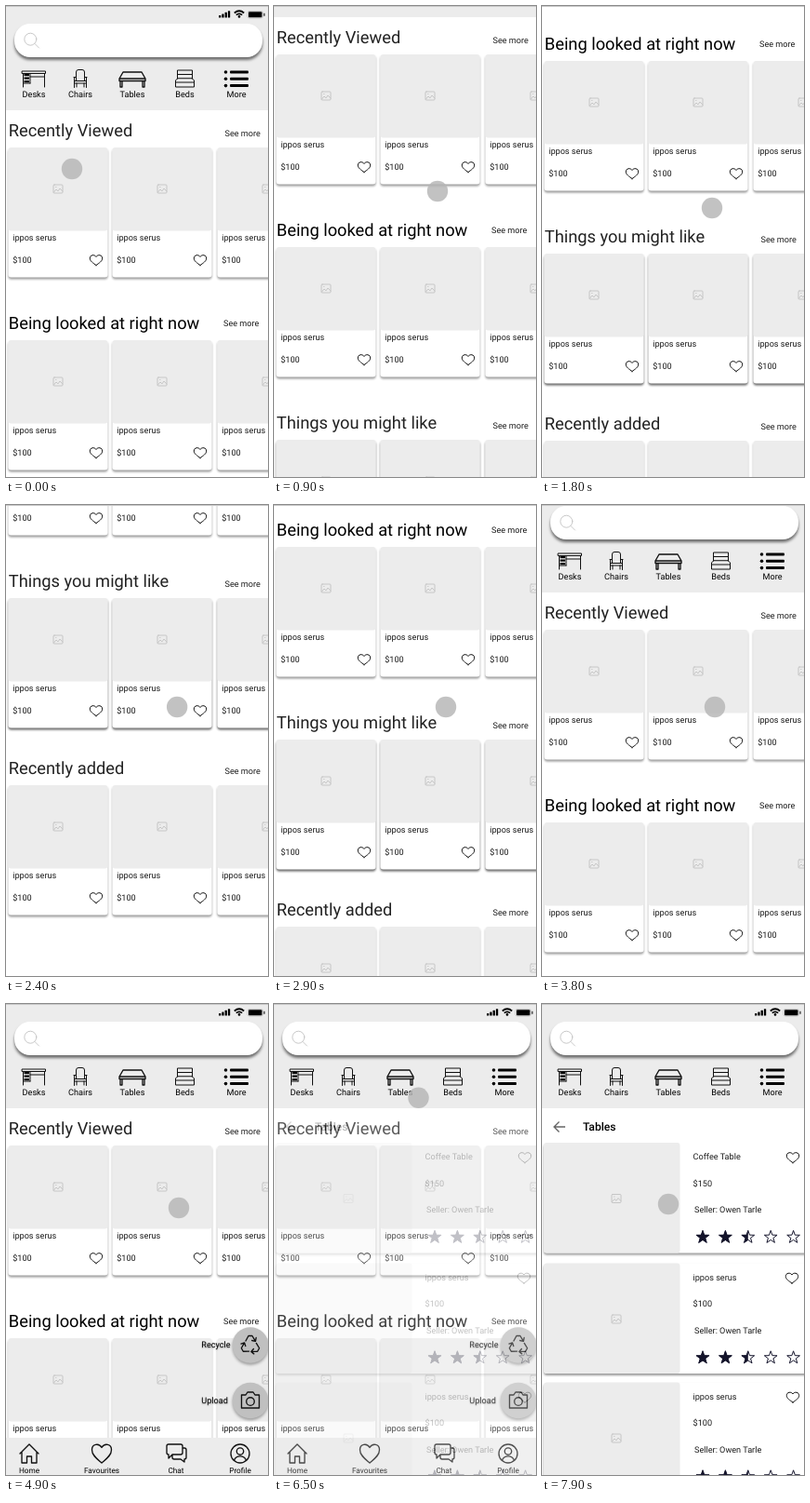
An HTML page that plays this animation: 282 by 506 pixels, repeating every 8000 ms.

```html
<!DOCTYPE html>
<html lang="en">
<head>
<meta charset="utf-8">
<title>Furniture shop prototype</title>
<style>
  html, body { margin: 0; width: 100%; height: 100%; overflow: hidden; background: #fff; }
  svg { display: block; width: 282px; height: 506px; }
  text { font: 9.15px Roboto, sans-serif; fill: #1c1c1c; text-rendering: geometricPrecision; }
  .title { font-size: 18.3px; fill: #222; }
  .heading { font-size: 12.1px; font-weight: 500; fill: #000; }
  .mid { text-anchor: middle; fill: #000; }
  .nav { font-size: 8.25px; }
  .float { fill: #000; text-shadow: 0 1px 1.5px #0006; }
  .line { fill: none; stroke: #111; stroke-width: 1; stroke-linejoin: round; stroke-linecap: round; }
  .bold { stroke-width: 1.35; }
  .pale { stroke: #c2c2c2; stroke-width: .9; }
  .card { fill: #fff; filter: drop-shadow(0 2px 1.1px #0006); }
  .dark { filter: drop-shadow(0 2px 1.1px #0009); }
  .search { fill: #fff; filter: drop-shadow(0 3px 1.5px #0008); }
  .fab { fill: #c0c0c0; filter: drop-shadow(0 2px 1.5px #0005); }
  .grey { fill: #ececec; }
</style>
</head>
<body>
<svg id="stage" viewBox="0 0 282 506"></svg>
<script>
const at = (x, y, body, scale = 1) => `<g transform="translate(${x} ${y}) scale(${scale})">${body}</g>`;
const label = (x, y, words, cls = '') => `<text x="${x}" y="${y}" class="${cls}">${words}</text>`;
const rect = (x, y, w, h, cls = '', r = 0) => `<rect x="${x}" y="${y}" width="${w}" height="${h}" rx="${r}" class="${cls}"/>`;
const line = (d, cls = '') => `<path d="${d}" class="line ${cls}"/>`;
const circle = (x, y, r, cls) => `<circle cx="${x}" cy="${y}" r="${r}" class="${cls}"/>`;

// Icons are drawn around their own centre.
const heart = line('M0 5.5C-3 3.2-6.7 1.2-6.7-1.9C-6.7-5.8-1.6-6.4 0-3.5C1.6-6.4 6.7-5.8 6.7-1.9C6.7 1.2 3 3.2 0 5.5Z');
const bigHeart = line('M0 10C-4.5 6-10.5 2-10.5-4C-10.5-10.5-3-11.5 0-6.5C3-11.5 10.5-10.5 10.5-4C10.5 2 4.5 6 0 10Z', 'bold');
const picture = rect(-5, -4.5, 10, 9, 'line pale', 1) + line('M-4.5 3.5L-2 .5L0 2.4L2-.5L4.8 2.5M-2.4-2h.4', 'pale');
const desk = line('M-12.5-8H12.5V-5.5H-12.5ZM-11.5-5V9M11.5-5V9M-4 5V-5M-11 5H-4M-4-2H11')
  + [-5, -1.5, 2].map(y => rect(-10.5, y, 5.5, 2.2)).join('');
const chair = line('M-4.5-1V-7Q-4.5-9.5-2-9.5H2Q4.5-9.5 4.5-7V-1M-7-1.5H-4.5V2M4.5 2V-1.5H7M-6.5-1V9.5M6.5-1V9.5M-6.5 2.5H6.5M-6.5 5H6.5M-4 5V9M4 5V9');
const table = line('M-10-7H10L14 0V2.5H-14V0ZM-14 0H14M-13 3V9H-11V3M13 3V9H11V3', 'bold');
const bed = line('M-8 0V-9H8V0M-8-4.5H8M-8 0L-10 2V9H10V2L8 0ZM-10 4H10');
const list = [-7, .3, 7.6].map(y => circle(-11.5, y, 1.8) + rect(-7, y - 1.5, 20, 3, '', 1)).join('');
const home = line('M-10 0L0-10L10 0M-8-2V10H-2.5V3H2.5V10H8V-2', 'bold');
const chat = line('M-8-10H5Q7-10 7-8V-1Q7 1 5 1H-4L-8 5V1Q-10 1-10-1V-8Q-10-10-8-10ZM7-6H9Q11-6 11-4V4Q11 6 9 6V9L5 6H-2Q-4 6-4 4V1', 'bold');
const profile = circle(0, 0, 10, 'line bold') + circle(0, -2.5, 3.7, 'line bold') + line('M-6.5 7.3Q-5 2.8 0 2.8T6.5 7.3', 'bold');
const camera = line('M-9.5-6H-5L-3-9H3L5-6H9.5V8H-9.5Z', 'bold') + circle(0, 1, 4.3, 'line bold');
const recycle = [0, 120, 240].map(a =>
  `<g transform="rotate(${a})">${line('M-5-4.5L-2-10H2L5.5-4.2M6.2-8L5.5-4.2L1.7-5', 'bold')}</g>`).join('');

const starPoints = Array.from({ length: 10 }, (_, i) => {
  const r = i % 2 ? 3.2 : 8, a = i * Math.PI / 5;
  return [r * Math.sin(a), -r * Math.cos(a)].map(v => v.toFixed(2)).join(' ');
});
const outline = `M${starPoints.join('L')}Z`, halfStar = `M${[...starPoints.slice(5), starPoints[0]].join('L')}Z`;
function star(fill) {
  const body = fill === 1 ? outline : fill ? halfStar : '';
  return `<path d="${outline}" transform="scale(.9)" fill="none" stroke="#14142b" stroke-width="1.1"/>`
    + `<path d="${body}" transform="scale(.98)" fill="#14142b"/>`;
}

function header() {
  const items = [[30, desk, 'Desks'], [80, chair, 'Chairs'], [136, table, 'Tables'], [192.5, bed, 'Beds'], [248, list, 'More']];
  const bars = [0, 1, 2, 3].map(i => rect(229 + i * 3.3, 10 - i * 1.6, 2.3, 2.5 + i * 1.6, '', .5)).join('');
  const wifi = '<path d="M245.8 7.5Q251 3 256.2 7.5M247.8 9.7Q251 7 254.2 9.7" fill="none" stroke="#000" stroke-width="1.7"/>'
    + circle(251, 11.4, 1.3);
  const battery = rect(260, 5.5, 16.5, 7.5, 'line pale', 2) + rect(261, 6.3, 14.5, 6, '', 1) + rect(277.5, 7.8, 1, 3);
  return rect(0, 0, 282, 112, 'grey') + bars + wifi + battery
    + rect(9, 19, 267, 36, 'search', 17)
    + circle(26.3, 35.7, 6.5, 'line pale') + line('M31 40.5L35.5 45', 'pale')
    + items.map(([x, icon, name]) => at(x, 78, icon) + label(x, 98, name, 'mid')).join('');
}

function section([offset, title, moreX, moreY, cls]) {
  const cards = [2.5, 114.5, 227.5].map(x => at(x, 152,
    rect(0, 0, 107, 139.5, 'card ' + cls, 3) + rect(0, 0, 107, 89.5, 'grey', 3) + at(53.5, 44.5, picture)
    + label(4.7, 100, 'ippos serus') + label(4.7, 124, '$100') + at(94.5, 121, heart))).join('');
  return at(0, offset, label(2.8, 140, title, 'title') + label(moreX, moreY, 'See more') + cards);
}

function navigation() {
  const items = [[25, home, 'Home'], [103, bigHeart, 'Favourites'], [183, chat, 'Chat'], [252, profile, 'Profile']];
  const fabs = [[366.5, recycle, 'Recycle'], [426, camera, 'Upload']];
  return fabs.map(([y, icon, name]) =>
    circle(263, y, 19.3, 'fab') + at(263, y, icon) + label(210.3, y + 2.8, name, 'float')).join('')
    + rect(0, 466, 282, 40, 'grey')
    + items.map(([x, icon, name]) => at(x, 483, icon) + label(x, 504, name, 'mid nav')).join('');
}

function tablesPage() {
  const products = [[149, 'Coffee Table', '$150', 270], [278.5, 'ippos serus', '$100', 269], [406.5, 'ippos serus', '$100', 270]];
  return '<rect y="112" width="282" height="394" fill="#fff"/>'
    + '<path d="M25 132H13M18.5 126.5L13 132L18.5 137.5" fill="none" stroke="#666" stroke-width="1.4"/>'
    + label(44, 135.5, 'Tables', 'heading')
    + products.map(([y, name, price, heartX]) => at(0, y,
      rect(2, 0, 290, 118.5, 'card', 3) + rect(2, 0, 146.5, 118.5, 'grey', 3) + at(80, 60, picture)
      + label(162.5, 18, name) + label(162.5, 46.8, price) + label(164, 75, 'Seller: Owen Tarle')
      + at(heartX, 16, heart)
      + [1, 1, .5, 0, 0].map((fill, i) => at(173 + i * 24.4, 101.5, star(fill))).join(''))).join('');
}

const sections = [
  [0, 'Recently Viewed', 235.5, 140, ''],
  [207, '<tspan fill="#000">Being looked at right now</tspan>', 234, 137, ''],
  [414, 'Things you might like', 235.5, 140, 'dark'],
  [615, 'Recently added', 235.5, 140, '']
];
const stage = document.getElementById('stage');
stage.innerHTML = `<g id="page">${sections.map(section).join('')}${header()}</g>
  <g id="nav">${navigation()}</g><g id="tables">${tablesPage()}</g>
  <rect width="282" height="1" fill="#cacaca"/>
  <circle id="cursor" r="11.2" fill="#b4b4b4" fill-opacity=".82"/>`;
const [page, nav, tables, cursor] = ['page', 'nav', 'tables', 'cursor'].map(id => document.getElementById(id));

// Each key is [time, ...values].
const scrollKeys = [[647, 0], [1300, 300], [1800, 300], [2400, 466], [2650, 466], [3200, 114], [3500, 114], [3900, 0]];
const navKeys = [[4200, 0], [4500, 1]];
const tablesKeys = [[6400, 0], [6700, 1]];
const cursorKeys = [
  [0, 71, 175], [300, 174, 190], [500, 174, 190], [900, 176, 199], [1500, 183, 217], [1800, 183, 217],
  [2900, 185, 217], [3400, 186, 217], [4800, 186, 217], [4900, 186, 219], [5150, 238, 360], [5350, 200, 483],
  [5700, 161, 109], [5900, 156, 97], [6400, 156, 97], [7300, 142, 208], [7900, 136, 215]
];

function track(keys, t) {
  const next = keys.findIndex(key => key[0] > t);
  if (next < 1) return keys.at(next).slice(1);
  const [t0, ...from] = keys[next - 1], [t1, ...to] = keys[next];
  const p = (t - t0) / (t1 - t0), eased = p * p * (3 - 2 * p);
  return from.map((v, i) => v + (to[i] - v) * eased);
}

function draw() {
  const t = Math.floor(performance.now() % 8000 / 100) * 100;
  const [x, y] = track(cursorKeys, t);
  page.setAttribute('transform', `translate(0 ${-Math.round(track(scrollKeys, t)[0])})`);
  nav.setAttribute('opacity', track(navKeys, t)[0]);
  tables.setAttribute('opacity', track(tablesKeys, t)[0]);
  cursor.setAttribute('cx', x);
  cursor.setAttribute('cy', y);
  requestAnimationFrame(draw);
}
draw();
</script>
</body>
</html>
```
